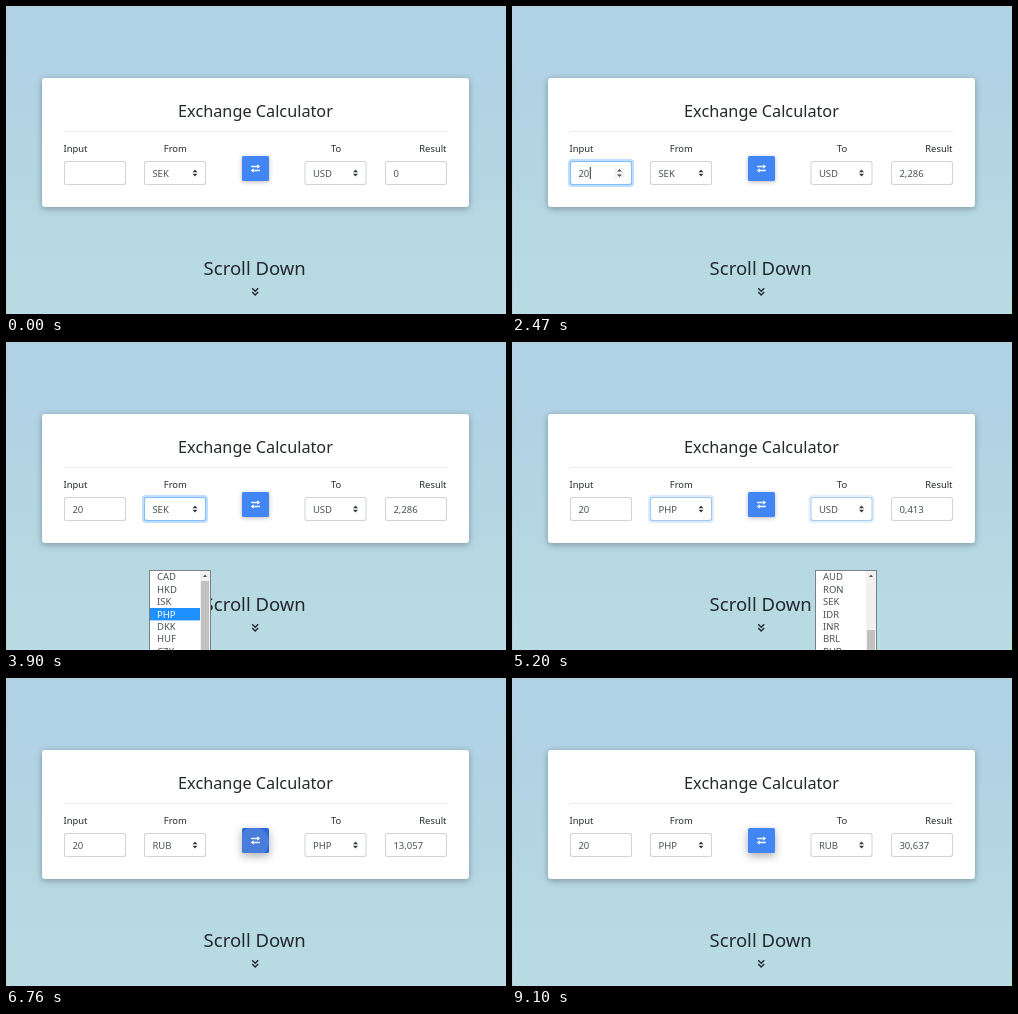
Animation of 500x308 px, one loop 9230 ms. Source, as an HTML page with a canvas:

```html
<!DOCTYPE html>
<html lang="en">
<head>
<meta charset="utf-8">
<title>Exchange Calculator</title>
<style>
  html, body { margin: 0; width: 100%; height: 100%; overflow: hidden; background: #b3d6e4; }
  canvas { display: block; }
</style>
</head>
<body>
<canvas id="stage" width="500" height="308"></canvas>
<script>
const ctx = document.getElementById('stage').getContext('2d');
const LOOP = 9230, TICK = 130;
const FONT = '"Noto Sans", "Open Sans", sans-serif';
const INK = '#24292e', FIELD = '#495057';
const CODES = 'CAD HKD ISK PHP DKK HUF CZK AUD RON SEK IDR INR BRL RUB HRK'.split(' ');

const within = (t, from, to) => t >= from && t < to;
const clamp = v => Math.max(0, Math.min(1, v));
// Fades in after `from` and out after `to`
const fade = (t, from, to, span = 150) => clamp((t - from) / span) * (1 - clamp((t - to) / span));
// Latest value in a list of [time, value] pairs
const at = (t, steps) => steps.filter(s => t >= s[0]).pop()[1];
const mix = (a, b, k) => a.map((v, i) => Math.round(v + (b[i] - v) * k));

function text(str, x, y, size, color = INK, align = 'left') {
  ctx.font = `${size}px ${FONT}`;
  ctx.textAlign = align;
  ctx.fillStyle = color;
  ctx.fillText(str, x, y);
}

function rect(x, y, w, h, color) {
  ctx.fillStyle = color;
  ctx.fillRect(x, y, w, h);
}

function box(x, y, w, h, r, color, shadow) {
  ctx.save();
  if (shadow) {
    ctx.shadowOffsetY = shadow.y;
    ctx.shadowBlur = shadow.blur;
    ctx.shadowColor = `rgba(0,0,0,${shadow.alpha})`;
  }
  ctx.beginPath();
  ctx.roundRect(x, y, w, h, r);
  ctx.fillStyle = color;
  ctx.fill();
  ctx.restore();
}

function shape(points, color) {
  ctx.beginPath();
  points.forEach(p => ctx.lineTo(...p));
  ctx.fillStyle = color;
  ctx.fill();
}

function arrows(x, y, half, tall, gap, color) {
  for (const d of [-1, 1])
    shape([[x - half, y + d * gap], [x + half, y + d * gap], [x, y + d * (gap + tall)]], color);
}

function field(x, value, focus = 0) {
  if (focus) box(x - 2, 153, 66, 28, 4, `rgba(0,123,255,${0.25 * focus})`);
  box(x, 155, 62, 24, 2.5, `rgb(${mix([206, 212, 218], [128, 189, 255], focus)})`);
  box(x + 1, 156, 60, 22, 2, '#fff');
  text(value, x + 8.4, 170.5, 9.5, FIELD);
}

function select(x, value, focus) {
  field(x, value, focus);
  arrows(x + 51, 167, 2.5, 2.7, 0.8, '#343a40');
}

function spinner(x) {
  rect(x - 5, 162, 10, 10, '#f3f3f3');
  arrows(x, 167, 2.4, 2.6, 1.4, '#505050');
}

function dropdown(x, first, hovered, thumbY, thumbH) {
  rect(x, 228, 62, 90, '#7a8084');
  rect(x + 1, 229, 60, 90, '#fff');
  CODES.slice(first, first + 7).forEach((code, i) => {
    const y = 229 + i * 12.4, on = code === hovered;
    if (on) rect(x + 1, y - 0.2, 51, 12.4, '#1e90ff');
    text(code, x + 8, y + 9.4, 9.5, on ? '#fff' : FIELD);
  });
  rect(x + 51, 229, 10, 90, '#f1f1f1');
  shape([[x + 54, 235], [x + 58, 235], [x + 56, 232.5]], '#505050');
  rect(x + 52, thumbY, 8, thumbH, '#c1c1c1');
}

function swapButton(t) {
  const hover = fade(t, 6180, 7640, 200);
  const press = Math.max(fade(t, 6565, 6760, 200), fade(t, 7085, 7215, 200));
  const lift = fade(t, 6180, 9230, 200);
  const tint = mix(mix([66, 133, 244], [91, 150, 246], hover), [43, 104, 214], press);
  box(236, 150, 27, 25, 1.5, `rgb(${tint})`,
    { y: 1 + 2 * lift, blur: 4 + 4 * lift, alpha: 0.28 + 0.04 * lift });

  ctx.save();
  ctx.beginPath();
  ctx.rect(236, 150, 27, 25);
  ctx.clip();
  for (const start of [6565, 7085]) {
    const p = (t - start) / 585;
    if (p <= 0 || p >= 1) continue;
    ctx.beginPath();
    ctx.arc(248, 164, 26 * Math.sqrt(p), 0, 7);
    ctx.fillStyle = `rgba(255,255,255,${0.2 * (1 - p)})`;
    ctx.fill();
  }
  ctx.restore();

  for (const d of [-1, 1]) {
    const x = 249.5, y = 162.5 + d * 2;
    ctx.fillStyle = '#fff';
    ctx.fillRect(x - 4.3 + (d > 0 ? 2 : 0), y - 0.7, 6.6, 1.4);
    shape([[x - d * 1.8, y - 2.2], [x - d * 1.8, y + 2.2], [x - d * 4.6, y]], '#fff');
  }
}

function page() {
  const sky = ctx.createLinearGradient(0, 0, 0, 308);
  sky.addColorStop(0, '#aed1e6');
  sky.addColorStop(1, '#b9dbe2');
  rect(0, 0, 500, 308, sky);
  rect(0, 0, 500, 1, '#bccdd3');
  rect(0, 0, 1, 308, '#bccdd3');

  box(36, 72, 427, 129, 3, '#fff', { y: 1.5, blur: 6, alpha: 0.32 });
  text('Exchange Calculator', 249.5, 111, 16.25, INK, 'center');
  rect(58, 125, 383, 1, '#ececec');
  text('Input', 57.5, 146, 9.4);
  text('From', 169.3, 146, 9.4, INK, 'center');
  text('To', 330, 146, 9.4, INK, 'center');
  text('Result', 440.5, 146, 9.4, INK, 'right');

  text('Scroll Down', 248.7, 269, 18.5, INK, 'center');
  ctx.strokeStyle = INK;
  ctx.lineWidth = 1.4;
  for (const y of [282.3, 286.1]) {
    ctx.beginPath();
    ctx.moveTo(246.2, y);
    ctx.lineTo(249.2, y + 3);
    ctx.lineTo(252.2, y);
    ctx.stroke();
  }
}

function draw(t) {
  page();

  const input = at(t, [[0, ''], [2210, '2'], [2470, '20']]);
  field(58, input, fade(t, 1365, 3445));
  if (within(t, 1170, 3510)) spinner(107.5);
  if (within(t, 1430, 1950) || within(t, 2210, 2990))
    rect(67 + input.length * 5.4, 161, 1, 12, '#333');

  select(138, at(t, [[0, 'SEK'], [4420, 'PHP'], [6760, 'RUB'], [7280, 'PHP']]), fade(t, 3445, 5135));
  select(298.5, at(t, [[0, 'USD'], [5850, 'RUB'], [6760, 'PHP'], [7280, 'RUB']]), fade(t, 5135, 6565));

  field(379, at(t, [
    [0, '0'], [2210, '0,229'], [2470, '2,286'], [4420, '0,413'],
    [5850, '30,637'], [6760, '13,057'], [7280, '30,637']
  ]));
  if (within(t, 7670, 8060)) spinner(428);

  swapButton(t);

  if (within(t, 3510, 4420))
    dropdown(143, 0, at(t, [[0, ''], [3640, 'HKD'], [3770, 'ISK'], [3900, 'PHP']]), 239, 80);
  if (within(t, 5200, 5850))
    dropdown(303, 7, at(t, [[0, ''], [5330, 'BRL'], [5460, 'RUB']]), 288, 30);
}

const start = performance.now();
function frame() {
  const t = (performance.now() - start) % LOOP;
  draw(Math.floor(t / TICK) * TICK);
  requestAnimationFrame(frame);
}
frame();
</script>
</body>
</html>
```
